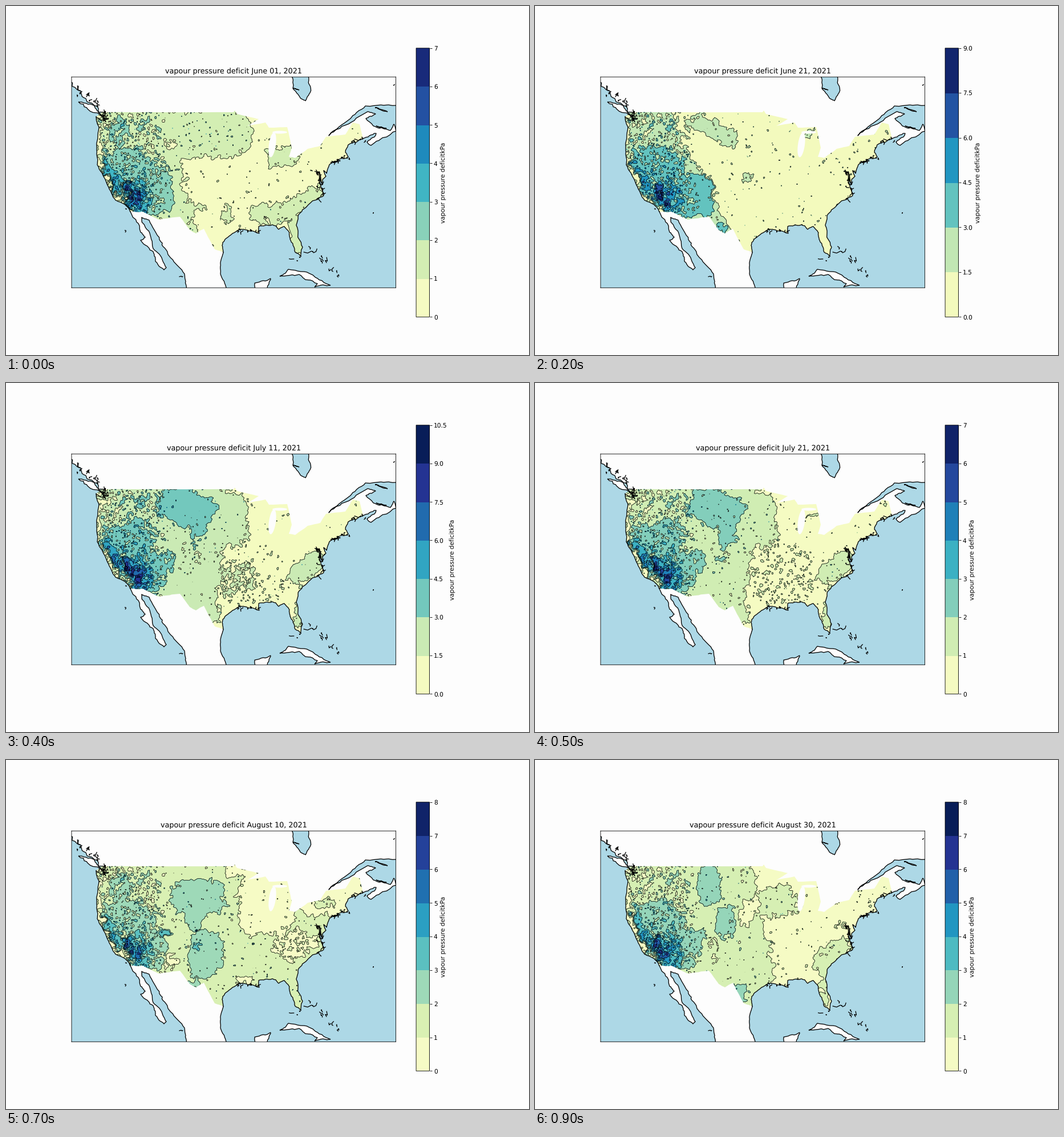
These frames come from a looping animation (917 px wide and 611 px high, 1 s). A matplotlib script:

```python
import numpy as np
import matplotlib.pyplot as plt
from matplotlib.animation import FuncAnimation
from matplotlib.path import Path

WIDTH, HEIGHT, DPI = 917, 611, 76.4
LEFT, RIGHT, TOP, BOTTOM = 115.0, 683.6, 124.2, 493.3
PAPER, WATER = "#fdfdfd", "lightblue"
plt.rcParams.update({"path.snap": False, "text.hinting": "none"})
rng = np.random.default_rng(4)


def rough(*xy, amp=0.07, depth=3):
    """Line through key points, with randomly displaced midpoints."""
    pts = np.array(xy, float).reshape(-1, 2)
    for _ in range(depth):
        step = np.diff(pts, axis=0)
        size = np.minimum(np.hypot(*step.T), 16)[:, None] * amp
        mids = pts[:-1] + step / 2 + rng.normal(0, 1, step.shape) * size
        out = np.empty((len(pts) + len(mids), 2))
        out[::2], out[1::2] = pts, mids
        pts = out
    return pts


# Shores in stage pixels, from the north-west around to the north-east
FJORDS = rough(114, 133, 140, 162, 171, 186, 175, 203, 158, 194, amp=0.15)
PACIFIC = rough(158, 194, 163, 212, 159, 252, 160, 278, 175, 306, 185, 328,
                192, 340, 209, 348, 218, 360, amp=0.04)
MEXICO_WEST = rough(218, 360, 236, 396, 244, 405, 236, 410, 258, 430, 262, 447,
                    277, 462, 281, 458, 266, 432, 254, 405, 238, 378, 238, 370,
                    251, 375, 269, 409, 284, 435, 313, 469, 316, 496)
MEXICO_EAST = rough(387, 496, 376, 469, 376, 449, 381, 431, amp=0.03)
GULF = rough(381, 431, 380, 414, 391, 403, 409, 391, 429, 394, 444, 398, 443, 386,
             467, 383, 478, 391, 488, 386, 497, 397, 499, 410, 507, 431, 517, 438)
ATLANTIC = rough(517, 438, 520, 422, 509, 384, 514, 364, 530, 348, 557, 332,
                 552, 315, 549, 290, 554, 311, 561, 298, 557, 288, 562, 293,
                 569, 276, 586, 271, 572, 273, 600, 264, 595, 256, 600, 243, 626, 232)
MARITIMES = rough(626, 232, 649, 223, 633, 238, 640, 244, 684, 219, 680, 207,
                  674, 218, 644, 210, 631, 197, 648, 189, 634, 185, 594, 209,
                  566, 227, 604, 197, 630, 175, 686, 174)
SOUTH_BORDER = rough(218, 360, 239, 360, 268, 374, 305, 369, 322, 392, 333, 398,
                     347, 390, 366, 426, 381, 431, amp=0.02)
NORTH_BORDER = rough(626, 232, 620, 207, 608, 204, 595, 225, 561, 229, 551, 245,
                     529, 250, 507, 266, 496, 264, 501, 248, 493, 212, 461, 213,
                     455, 204, 423, 210, 443, 198, 405, 189, 401, 183, 399, 186,
                     168, 186, 158, 194, amp=0.01)
COASTS = [FJORDS, PACIFIC, MEXICO_WEST, MEXICO_EAST, GULF, ATLANTIC, MARITIMES]
LAND = np.vstack(COASTS + [[(686, 120), (112, 120)]])
COUNTRY = np.vstack([PACIFIC, SOUTH_BORDER, GULF, ATLANTIC, NORTH_BORDER])
BAY = rough(501, 122, 503, 144, 516, 161, 525, 166, 533, 152, 530, 122)
ISLANDS = [
    rough(127, 168, 154, 174, 168, 192, 145, 182, 127, 168, amp=0.1),
    rough(480, 473, 495, 461, 538, 471, 569, 489, 541, 492, 546, 486, 514, 470, 480, 473),
    rough(436, 496, 436, 485, 464, 477, 457, 496),
    rough(647, 178, 669, 185, 647, 178),
    rough(649, 210, 667, 214, 649, 210),
    rough(504, 144, 514, 147, 504, 144),
]
LAKES = [(467, 243, 6, 22, 8), (480, 221, 13, 2.5, 0)]


def scribbles(x0, y0, x1, y1, count, size):
    """Short random strokes along a line, for fjords, inlets and islets."""
    for t in np.linspace(0, 1, count):
        start = (x0 + t * (x1 - x0), y0 + t * (y1 - y0)) + rng.normal(0, size / 3, 2)
        yield start + np.cumsum(rng.normal(0, size / 2, (4, 2)), axis=0)


INLETS = [
    (120, 140, 168, 182, 14, 5), (173, 190, 176, 204, 8, 4),     # north-west
    (548, 288, 553, 324, 13, 4), (546, 337, 556, 327, 4, 4),     # Atlantic bays
    (570, 274, 601, 266, 8, 3), (602, 242, 628, 231, 8, 3),
    (402, 392, 448, 393, 10, 3), (506, 443, 516, 441, 3, 3),     # Gulf
    (531, 422, 583, 474, 11, 5), (209, 397, 206, 352, 2, 2),     # islets
    (305, 475, 305, 475, 1, 2), (644, 362, 644, 362, 1, 1), (682, 139, 682, 139, 1, 3),
]

# Weather grid
X, Y = np.meshgrid(np.arange(148.0, 644), np.arange(174.0, 446))
K = np.hypot(np.fft.fftfreq(X.shape[0])[:, None], np.fft.fftfreq(X.shape[1]))


def spectral(data, gain):
    return np.fft.ifft2(np.fft.fft2(data) * gain).real


def noise(seed, scale):
    """Fractal noise of unit spread, with features up to about scale pixels."""
    white = np.random.default_rng(seed).normal(size=X.shape)
    out = spectral(white, (K**2 + scale**-2.0) ** -0.8 * np.exp(-(K / 0.32) ** 2))
    return (out - out.mean()) / out.std()


TERRAIN = noise(1, 12)
WEST = 1 / (1 + np.exp((X - 285) / 9))
HOT = np.exp(-((X - 226) ** 2 + (Y - 330) ** 2) / 900)
SEASIDE = X < np.interp(Y, *np.sort(PACIFIC, axis=0).T[::-1]) + 6


def blob(value, cx, cy, rx, ry, tilt=0):
    """Rounded box, tilted clockwise in degrees."""
    a = np.radians(tilt)
    u = (X - cx) * np.cos(a) + (Y - cy) * np.sin(a)
    v = (Y - cy) * np.cos(a) - (X - cx) * np.sin(a)
    return value, abs(u / rx) ** 3 + abs(v / ry) ** 3 < 1


def west_of(value, north_x, south_x):
    return value, X < north_x + (south_x - north_x) * (Y - 186) / 245


def weather(seed, base, basin, heat, regions):
    """Paint regions in colour-band units, then fray edges and add relief."""
    common = [
        blob(basin, 212, 274, 38, 30), blob(basin, 252, 282, 10, 20),
        blob(basin, 245, 332, 36, 36), blob(heat, 188, 302, 9, 38, -25),
        blob(heat + 0.2, 233, 335, 20, 30, -25), blob(heat + 1.7, 221, 330, 6, 24, -32),
        (0.6, SEASIDE),
    ]
    band = np.full(X.shape, float(base))
    for value, inside in regions + common:
        band[inside] = value
    rows = np.clip(Y - 174 + 4 * noise(seed, 26), 0, X.shape[0] - 1).astype(int)
    cols = np.clip(X - 148 + 4 * noise(seed + 50, 26), 0, X.shape[1] - 1).astype(int)
    band = spectral(band[rows, cols], np.exp(-2 * (np.pi * K) ** 2))
    speckle = noise(seed + 90, 8)
    return (band + (0.4 * WEST + 0.3 * HOT) * TERRAIN
            + (1 - WEST) * (0.1 * speckle + 0.018 * speckle**3))


JUNE_01 = [
    west_of(1.5, 290, 342), blob(1.5, 350, 222, 80, 43), blob(2.4, 197, 217, 15, 25),
    blob(2.4, 272, 320, 22, 38), blob(0.8, 290, 237, 11, 9),
    blob(1.4, 466, 363, 38, 19), blob(1.4, 520, 342, 42, 14, -35),
    blob(1.4, 508, 400, 12, 38), blob(1.3, 484, 262, 28, 18),
    blob(1.3, 388, 361, 8, 16), blob(1.3, 335, 357, 14, 7),
]
JUNE_21 = [
    west_of(1.45, 238, 362), blob(1.4, 312, 216, 48, 17, 25), blob(2.4, 278, 330, 34, 40),
    blob(1.5, 262, 330, 8, 16), blob(1.3, 373, 298, 10, 10), blob(2.4, 328, 392, 10, 8),
    blob(1.1, 480, 220, 10, 7),
]
JULY_01 = [
    west_of(1.45, 330, 330), blob(1.45, 370, 228, 64, 44), blob(1.45, 385, 358, 62, 46),
    blob(0.6, 313, 298, 12, 42), blob(2.45, 325, 212, 64, 32), blob(3.4, 294, 205, 24, 18),
    blob(2.4, 216, 205, 30, 20), blob(2.7, 220, 245, 20, 16),
    blob(1.2, 518, 332, 42, 16, -40), blob(0.86, 440, 377, 50, 15),
    blob(0.6, 172, 215, 12, 34),
]
JULY_21 = [
    west_of(1.45, 390, 365), blob(1.45, 392, 242, 34, 50), blob(0.86, 432, 335, 58, 55),
    blob(2.4, 317, 220, 52, 30, 15), blob(2.4, 335, 268, 15, 22),
    blob(2.3, 327, 303, 10, 6), blob(2.4, 235, 255, 30, 20),
    blob(2.2, 280, 310, 20, 22), blob(1.4, 527, 325, 40, 18, -45),
    blob(1.4, 510, 405, 8, 24), blob(1.1, 482, 233, 10, 6), blob(1.1, 612, 212, 7, 5),
]
AUGUST_10 = [
    blob(0.5, 455, 250, 50, 56), blob(0.5, 580, 235, 75, 38), blob(0.5, 425, 195, 40, 9),
    blob(0.9, 500, 322, 34, 30), blob(0.7, 541, 315, 9, 12),
    blob(2.45, 332, 238, 48, 30), blob(2.45, 330, 275, 18, 22), blob(2.45, 350, 338, 33, 42),
    blob(2.4, 202, 220, 18, 25), blob(0.85, 278, 350, 22, 14), blob(3.3, 277, 303, 14, 9, -30),
    blob(3.1, 333, 326, 12, 4, -20), blob(1.2, 555, 250, 20, 8), blob(0.7, 416, 384, 14, 6),
    blob(2.4, 328, 390, 10, 9),
]
AUGUST_20 = [
    blob(0.55, 325, 232, 80, 58), blob(0.55, 425, 288, 32, 14), blob(0.6, 442, 338, 24, 31),
    blob(0.8, 525, 290, 58, 18, -38), blob(1.25, 350, 198, 42, 18),
    blob(0.8, 282, 310, 18, 45), blob(0.6, 172, 220, 15, 32),
    blob(2.4, 348, 335, 34, 45), blob(3.3, 342, 321, 8, 9), blob(2.4, 352, 412, 16, 24),
]
AUGUST_30 = [
    west_of(1.45, 382, 428), blob(1.45, 425, 248, 36, 24), blob(0.6, 375, 262, 15, 22),
    blob(2.4, 304, 222, 18, 34), blob(2.4, 333, 283, 18, 26), blob(2.4, 280, 315, 18, 20),
    blob(0.8, 314, 336, 4, 26), blob(1.35, 520, 343, 38, 20, -40),
    blob(1.35, 508, 393, 9, 34), blob(1.1, 533, 291, 12, 7), blob(2.4, 358, 408, 11, 18),
]

# date, level step, top level, colour maximum, weather (None: between neighbours)
FRAMES = [
    ("June 01", 1, 7, 7.0, (0.5, 2.4, 3.4, JUNE_01)),
    ("June 11", 1, 8, 7.6, None),
    ("June 21", 1.5, 9, 8.65, (0.5, 2.3, 2.9, JUNE_21)),
    ("July 01", 1, 8, 7.3, (0.5, 2.4, 3.3, JULY_01)),
    ("July 11", 1.5, 10.5, 9.4, None),
    ("July 21", 1, 7, 6.75, (0.5, 2.5, 3.5, JULY_21)),
    ("July 31", 1, 8, 7.5, None),
    ("August 10", 1, 8, 7.8, (1.45, 2.4, 3.3, AUGUST_10)),
    ("August 20", 0.8, 5.6, 5.42, (1.4, 2.0, 2.9, AUGUST_20)),
    ("August 30", 1, 8, 7.4, (0.5, 2.5, 3.5, AUGUST_30)),
]
bands = [spec and weather(10 + i, *spec) for i, (*_, spec) in enumerate(FRAMES)]
for i, band in enumerate(bands):
    if band is None:
        bands[i] = 0.25 * bands[i - 1] + 0.75 * bands[i + 1]

fig = plt.figure(figsize=((WIDTH + 1e-6) / DPI, (HEIGHT + 1e-6) / DPI), dpi=DPI,
                 facecolor=PAPER)


def add_axes(left, right, top, bottom):
    return fig.add_axes([left / WIDTH, 1 - bottom / HEIGHT,
                         (right - left) / WIDTH, (bottom - top) / HEIGHT])


ax = add_axes(LEFT, RIGHT, TOP, BOTTOM)
ax.set(xlim=(LEFT, RIGHT), ylim=(BOTTOM, TOP), xticks=[], yticks=[], facecolor=WATER)
ax.set_autoscale_on(False)
ax.fill(*LAND.T, color=PAPER, lw=0, zorder=1)
ax.fill(*BAY.T, color=WATER, lw=0, zorder=1.1)
angle = np.linspace(0, 2 * np.pi, 40)
for cx, cy, rx, ry, tilt in LAKES:
    a = np.radians(tilt)
    u, v = rx * np.cos(angle), ry * np.sin(angle)
    ax.fill(cx + u * np.cos(a) - v * np.sin(a), cy + u * np.sin(a) + v * np.cos(a),
            color=PAPER, lw=0, zorder=3.5)
for island in ISLANDS:
    ax.fill(*island.T, fc=PAPER, ec="k", lw=1.2, zorder=4)
strokes = [stroke for inlet in INLETS for stroke in scribbles(*inlet)]
for line in COASTS + [BAY] + strokes:
    ax.plot(*line.T, "k", lw=1.2, zorder=4)

shown = []


def draw(i):
    while shown:
        shown.pop().remove()
    date, step, top, peak, _ = FRAMES[i]
    levels = np.arange(round(top / step) + 1) * step
    data = np.clip(bands[i] * step, 0.05 * step, top - 0.05 * step)
    fills = ax.contourf(X, Y, data, levels, cmap="YlGnBu", vmin=0, vmax=peak, zorder=2)
    lines = ax.contour(X, Y, data, levels, colors="k", linewidths=0.7, zorder=3)
    for layer in (fills, lines):
        layer.set_clip_path(Path(COUNTRY), ax.transData)
    ax.set_title(f"vapour pressure deficit {date}, 2021")
    cax = add_axes(719.1, 742.5, 73.7, 544.4)
    fig.colorbar(fills, cax=cax, label="vapour pressure deficitkPa")
    shown.extend([fills, lines, cax])
    return []


anim = FuncAnimation(fig, draw, frames=len(FRAMES), interval=100,
                     init_func=lambda: [], repeat=True, repeat_delay=0)
plt.show()
```
